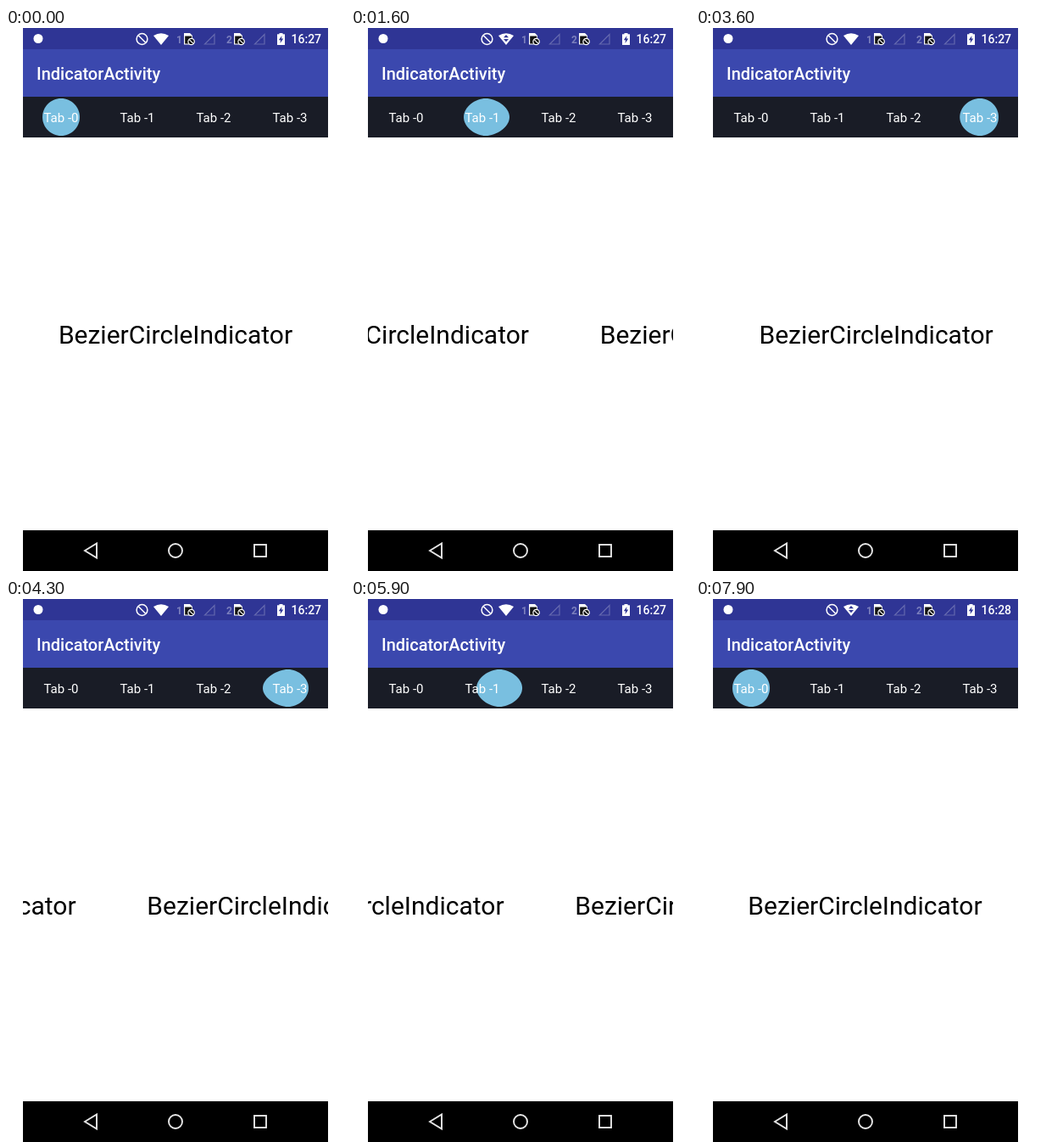
Animation, 400 px wide and 640 px high, one loop 8 s. Source, as an HTML page with a canvas:

```html
<!DOCTYPE html>
<html lang="en">
<head>
<meta charset="utf-8">
<title>Bezier circle indicator</title>
<style>
  html, body { margin: 0; width: 100%; height: 100%; overflow: hidden; background: #fff; }
  canvas { display: block; width: 400px; height: 640px; }
</style>
</head>
<body>
<canvas id="stage"></canvas>
<script>
const LOOP = 8000, STEP = 100;
const STATUS = '#2f3595', TOOLBAR = '#3b48ae', TABS = '#191c26', BLOB = '#79bfe0';
const DIM = '#7c80bd', R = 22, GAP = 90, PAGE = 360;

const canvas = document.getElementById('stage');
const dpr = window.devicePixelRatio || 1;
canvas.width = 400 * dpr;
canvas.height = 640 * dpr;
const g = canvas.getContext('2d');
g.scale(dpr, dpr);

// Pager position over time: [ms, page]
const swipes = [
  [0, 0], [1150, 1], [1600, 1.356], [2350, 2], [2700, 2.167], [3600, 2.965],
  [3760, 3], [4900, 2.19], [5250, 2], [6450, 1], [6900, 0.856], [7850, 0.002], [8000, 0.001]
];

const clamp = v => Math.max(0, Math.min(1, v));
const mix = (a, b, k) => a + (b - a) * k;

function slope(i) {
  const [t, p] = swipes[i];
  if (i === 0 || i === swipes.length - 1 || Number.isInteger(p)) return 0;
  const [ta, pa] = swipes[i - 1], [tb, pb] = swipes[i + 1];
  const a = (p - pa) / (t - ta), b = (pb - p) / (tb - t);
  return a * b > 0 ? 2 * a * b / (a + b) : 0;
}

function pageAt(t) {
  let i = 0;
  while (i < swipes.length - 2 && t >= swipes[i + 1][0]) i++;
  const [t0, p0] = swipes[i], [t1, p1] = swipes[i + 1];
  const d = t1 - t0, k = (t - t0) / d, k2 = k * k, k3 = k2 * k;
  return mix(p0, p1, 3 * k2 - 2 * k3)
    + d * ((k3 - 2 * k2 + k) * slope(i) + (k3 - k2) * slope(i + 1));
}

function rect(x, y, w, h, color) {
  g.fillStyle = color;
  g.fillRect(x, y, w, h);
}

function text(s, x, y, size, color, weight = 400, align = 'left') {
  g.font = `${weight} ${size}px Roboto, sans-serif`;
  g.textAlign = align;
  g.fillStyle = color;
  g.fillText(s, x, y);
}

function poly(points, closed = true) {
  g.beginPath();
  points.forEach(([x, y]) => g.lineTo(x, y));
  if (closed) g.closePath();
}

function fillPoly(points, color) {
  poly(points);
  g.fillStyle = color;
  g.fill();
}

function strokePoly(points, color, width, closed = true) {
  poly(points, closed);
  g.strokeStyle = color;
  g.lineWidth = width;
  g.stroke();
}

function circle(x, y, r) {
  g.beginPath();
  g.arc(x, y, r, 0, Math.PI * 2);
}

function wifi(active) {
  g.beginPath();
  g.moveTo(183, 20);
  g.lineTo(174, 9);
  g.quadraticCurveTo(183, 3.4, 192, 9);
  g.closePath();
  g.fillStyle = '#fff';
  g.fill();
  if (!active) return;
  fillPoly([[180, 11.3], [183, 8], [186, 11.3]], STATUS);
  fillPoly([[180, 13], [186, 13], [183, 16.2]], STATUS);
}

function sim(label, x) {
  text(label, x, 18, 12, DIM, 700);
  const l = x + 9;
  fillPoly([[l, 6], [l + 7, 6], [l + 10, 9], [l + 10, 19.5], [l, 19.5]], '#fff');
  rect(l + 1.2, 9.5, 8, 9, '#111');
  circle(l + 8.6, 16, 3.7);
  g.fillStyle = '#111';
  g.fill();
  g.strokeStyle = '#fff';
  g.lineWidth = 1.2;
  g.stroke();
  strokePoly([[l + 6.2, 13.6], [l + 11, 18.4]], '#fff', 1.2, false);
  strokePoly([[x + 33.5, 19], [x + 45, 7.5], [x + 45, 19]], '#6468ae', 1.2);
}

function statusBar(t) {
  rect(20, 0, 360, 25, STATUS);
  circle(38, 12.5, 5.5);
  g.fillStyle = '#fff';
  g.fill();
  circle(160.5, 13, 6.4);
  g.strokeStyle = '#fff';
  g.lineWidth = 1.5;
  g.stroke();
  strokePoly([[156, 8.5], [165, 17.5]], '#fff', 1.5, false);
  wifi((t >= 1000 && t < 2000) || (t >= 4600 && t < 5600) || t >= 7300);
  sim('1', 201);
  sim('2', 260);
  rect(320, 7.3, 9, 12.7, '#fff');
  rect(322.5, 6, 4, 2, '#fff');
  fillPoly([[325.5, 9], [321.8, 14.2], [324, 14.2], [323.5, 18], [327.3, 12.6], [325, 12.6]], STATUS);
  text(t < 7400 ? '16:27' : '16:28', 336.5, 18, 14, '#fff', 500);
}

// Stretch towards the neighbour, travel across, then relax.
function blob(p) {
  const page = Math.floor(p), f = p - page;
  const near = f < 0.5 ? 1 : -1, u = Math.min(f, 1 - f);
  const home = 65 + GAP * (near > 0 ? page : page + 1);
  const stretch = 10 * clamp(u / 0.2), lean = 5 * clamp((u - 0.2) / 0.2);
  const travel = near * clamp((u - 0.4) / 0.2) * (GAP - 10);
  const front = home + near * (R + stretch) + travel;
  const back = home - near * R + travel;
  const mid = home + near * lean + travel;
  const left = Math.min(front, back), right = Math.max(front, back);
  const y = 105, c = R * 0.5523;
  g.beginPath();
  g.moveTo(mid, y - R);
  g.bezierCurveTo(mid + c, y - R, right, y - c, right, y);
  g.bezierCurveTo(right, y + c, mid + c, y + R, mid, y + R);
  g.bezierCurveTo(mid - c, y + R, left, y + c, left, y);
  g.bezierCurveTo(left, y - c, mid - c, y - R, mid, y - R);
  g.fillStyle = BLOB;
  g.fill();
}

function navBar() {
  rect(20, 592, 360, 48, '#000');
  const ink = '#e6e6e6';
  strokePoly([[93, 616], [107, 607.5], [107, 624.5]], ink, 1.9);
  circle(200, 616, 8);
  g.stroke();
  g.strokeRect(293, 609, 14, 14);
}

function draw(t) {
  const p = pageAt(t);
  rect(0, 0, 400, 640, '#fff');
  g.save();
  g.beginPath();
  g.rect(20, 0, 360, 640);
  g.clip();
  statusBar(t);
  rect(20, 25, 360, 56, TOOLBAR);
  text('IndicatorActivity', 36, 61, 20, '#fff', 500);
  rect(20, 81, 360, 48, TABS);
  blob(p);
  for (let i = 0; i < 4; i++) {
    text('Tab -' + i, 65 + GAP * i, 111, 15, '#fff', 400, 'center');
    text('BezierCircleIndicator', 200 + (i - p) * PAGE, 372, 30, '#000', 400, 'center');
  }
  navBar();
  g.restore();
}

const start = performance.now();
function tick() {
  const t = (performance.now() - start) % LOOP;
  draw(Math.floor(t / STEP) * STEP);
  requestAnimationFrame(tick);
}
tick();
</script>
</body>
</html>
```
